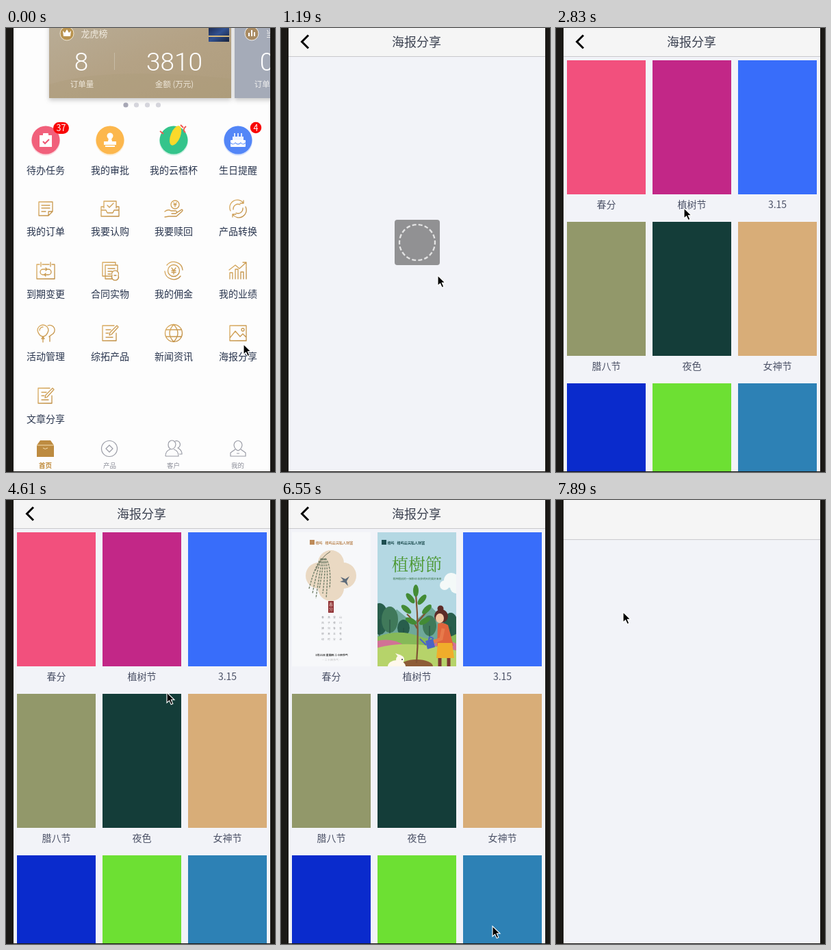
Animation, 393 px wide and 646 px high, one loop 8 s. Source, as an HTML page:

```html
<!DOCTYPE html>
<html lang="zh-CN">
<head>
<meta charset="utf-8">
<style>
html, body { margin: 0; width: 100%; height: 100%; overflow: hidden; background: #1b1916; }
svg { display: block; font-family: "Noto Sans CJK SC", "Noto Sans CJK", sans-serif; }
.serif { font-family: "Noto Serif CJK SC", "Noto Sans CJK SC", serif; }
.thin { font-family: Roboto, sans-serif; font-weight: 300; }
.line { fill: none; stroke: url(#gold); stroke-width: 1.3; stroke-linejoin: round; stroke-linecap: round; }
.tab { fill: none; stroke: #9a9ca6; stroke-width: 1.2; stroke-linejoin: round; }
</style>
</head>
<body>
<svg id="stage" width="393" height="646" viewBox="0 0 393 646"></svg>
<script>
const text = (x, y, str, size, fill, more = '') =>
  `<text x="${x}" y="${y}" font-size="${size}" fill="${fill}" text-anchor="middle" ${more}>${str}</text>`;
const column = (x, y, str, size, fill, step = size * 1.1) =>
  [...str].map((c, i) => text(x, y + i * step, c, size, fill)).join('');
const rect = (x, y, w, h, fill, more = '') =>
  `<rect x="${x}" y="${y}" width="${w}" height="${h}" fill="${fill}" ${more}/>`;
const disc = (x, y, r, fill, more = '') => `<circle cx="${x}" cy="${y}" r="${r}" fill="${fill}" ${more}/>`;
const oval = (x, y, rx, ry, fill, more = '') =>
  `<ellipse cx="${x}" cy="${y}" rx="${rx}" ry="${ry}" fill="${fill}" ${more}/>`;
const shape = (d, fill, more = '') => `<path d="${d}" fill="${fill}" ${more}/>`;
const stroke = (d, color, width, more = '') =>
  `<path d="${d}" fill="none" stroke="${color}" stroke-width="${width}" ${more}/>`;
const at = (x, y, body, more = '') => `<g transform="translate(${x} ${y})" ${more}>${body}</g>`;
const range = (n, f) => Array.from({ length: n }, (_, i) => f(i)).join('');
const ring = r => `M${-r} 0A${r} ${r} 0 1 1 ${r} 0A${r} ${r} 0 1 1 ${-r} 0`;

// ---------- home page ----------
const cols = [58, 152, 245, 339];
const yen = 'M-3-4L0 0L3-4M0 0V5M-3 0H3M-3 2.5H3';
const pen = 'M6-11H-11V11H9V0M-6-5H1M-6 0H-2M-6 6H4M-1 3L0-1L10-11L12-9L2 2Z';
const menu = [
  ['我的订单', 'M4 10H-10V-10H10V4L4 10V4H10M-6-5H6M-6-1H6M-6 4H0'],
  ['我要认购', 'M-9-1V-11H9V-1M-9-3H-13V11H13V-3H9M-13 2H-6L-4 6H4L6 2H13M-4-5L-1-2L5-8'],
  ['我要赎回', 'M-13 4Q-8 0-4 3H3Q6 4 3 7H-3M4 6L12 1Q14 2 12 4L4 11H-7L-13 12'
    + 'M-4-6A6 6 0 1 1 8-6A6 6 0 1 1-4-6M0-9L2-6L4-9M2-6V-3M0-6H4'],
  ['产品转换', 'M-11 3A11 11 0 0 1 8-8M8-8V-12M8-8H3M11-3A11 11 0 0 1-8 8M-8 8V12M-8 8H-3'
    + 'M-7 1A7 7 0 0 1 3-6M7-1A7 7 0 0 1-3 6'],
  ['到期变更', 'M-9-9H-13V12H13V-9H9M-5-9H5M-7-12V-6M7-12V-6M-1 6H-4A4 4 0 0 1-4-2H2M1-2H4A4 4 0 0 1 4 6H-2M0-4L2-2L0 0M0 4L-2 6L0 8'],
  ['合同实物', 'M2 8H-11V-12H8V-9M-7-8H11V0M-7-8V12H3M-3-3H7M-3 1H3M-3 5H1M3 7A5 5 0 1 1 12 7A5 5 0 1 1 3 7M6 7H9'],
  ['我的佣金', 'M-10-8A13 13 0 0 1 13-1M10 8A13 13 0 0 1-13 1' + ring(8.5) + yen],
  ['我的业绩', 'M-12 12V3H-8V12M-4 12V-2H0V12M4 12V2H8V12M12 12V-6M-13-1L-4-8L2-3L12-12M7-12H12V-7'],
  ['活动管理', 'M-12-4A8 8 0 1 1 4-4Q2 4-4 5Q-10 4-12-4M-4 5L-6 8H-2ZM-4 8V13M3-11A7 7 0 0 1 9 2L5 5M6 5V12M-9-4A5 5 0 0 1-4-9'],
  ['综拓产品', pen],
  ['新闻资讯', ring(12.5) + 'M0-12.5Q-12 0 0 12.5Q12 0 0-12.5M-11-5H11M-11 5H11'],
  ['海报分享', 'M-12-11H12V11H-12ZM-12 7L-4-3L3 5L7 1L12 6M5-5A2 2 0 1 1 9-5A2 2 0 1 1 5-5'],
  ['文章分享', pen]
];
const topIcons = [
  shape('M-9-7H9V10H-9Z', '#fff') + rect(-4, -10, 8, 5, '#fff', 'rx="1"') + stroke('M-4 2L-1 5L5-1', '#ee5572', 2),
  disc(0, -6, 4.5, '#fff') + shape('M-2-3H2L3 2H9V7H-9V2H-3Z', '#fff') + rect(-7, 8, 14, 2, '#fff'),
  oval(0, -7, 7, 15, '#fbd92b', 'transform="rotate(22)"') + stroke('M10-22L14-18M17-11Q12-15 18-20M-15-9L-20-13', '#f05a54', 2),
  rect(-11, 0, 22, 10, '#fff', 'rx="1"') + rect(-8, -5, 16, 5, '#eef3ff')
    + stroke('M-5-5V-10M0-5V-10M5-5V-10', '#fff', 1.6) + stroke('M-11 4Q-7 8-4 4Q0 8 4 4Q7 8 11 4', '#79a4fb', 1.2)
];
const topNames = ['待办任务', '我的审批', '我的云梧杯', '生日提醒'];
const topFills = ['#f1607b', '#fcb74d', '#34c48b', '#5386f7'];
const ink = '#28344d';

const card = rect(63, -10, 266, 112, 'url(#tan)', 'filter="url(#soft)"')
  + shape('M63 82Q150 55 329 74V102H63Z', '#a99676', 'opacity=".25"')
  + disc(89, 8, 10, '#b9934f', 'stroke="#f1e6cf"')
  + shape('M83 4L86 7L89 2L92 7L95 4L94 12H84Z', '#fff')
  + text(129, 13, '龙虎榜', 13, '#f0eadf')
  + text(110, 62, '8', 37, '#fff', 'class="thin"') + text(246, 62, '3810', 37, '#fff', 'class="thin"')
  + text(111, 86, '订单量', 11.5, '#eee7da') + text(246, 86, '金额 (万元)', 11.5, '#eee7da')
  + rect(158, 36, 1, 25, '#c7bca6')
  + rect(296, -4, 30, 24, 'url(#night)') + rect(296, 11, 30, 2, '#d5b77b')
  + rect(334, -10, 60, 112, '#a5abb8', 'filter="url(#soft)"')
  + disc(359, 8, 10, '#a98b62', 'stroke="#eee"') + stroke('M355 12V7M359 12V3M363 12V6', '#fff', 2)
  + text(386, 13, '当', 13, '#eee') + text(381, 62, '0', 37, '#fff', 'class="thin"')
  + text(380, 86, '订单量', 11.5, '#eee');

const home = rect(11, 0, 375, 645, '#fdfdfd') + card
  + [175, 190.5, 206.5, 222.5].map((x, i) => disc(x, 112, 3.6, i ? '#d5d5dc' : '#a7a7b5')).join('')
  + cols.map((x, i) => at(x, 163, disc(0, 1.5, 21, topFills[i], 'opacity=".25"') + disc(0, 0, 20.5, topFills[i]) + topIcons[i])
    + text(x, 212, topNames[i], 14, ink)).join('')
  + rect(69, 137, 23, 17, '#f80404', 'rx="8.5"') + text(80.5, 150, '37', 12.5, '#fff')
  + disc(365, 145, 8.2, '#f80404') + text(365, 149.5, '4', 12.5, '#fff')
  + menu.map(([name, d], i) => {
    const x = cols[i % 4], y = [263, 353, 444, 535][i >> 2];
    return at(x, y, `<path class="line" d="${d}"/>`) + text(x, [301, 392, 483, 574][i >> 2], name, 14, ink);
  }).join('')
  + shape('M45 607L50 600H65L70 607V624H45Z', 'url(#gold)') + stroke('M45 607H70M54 611Q57 614 61 611', '#f5dfb3', 1)
  + `<g class="tab">${at(151, 612, `<path d="${ring(11.5)}M0-5L5 0L0 5L-5 0Z"/>`)
    + at(245, 612, '<path d="M-8-6A5.5 6 0 1 1 3-6Q2 0-3 1Q-8 0-8-6M-12 11Q-12 3-5 1M0 1Q7 3 7 11H-12M2-11A5 5 0 1 1 6-1Q12 2 12 8H8"/>')
    + at(339, 612, '<path d="M-6-5A6 6.5 0 1 1 6-5Q5 1 0 3Q-5 1-6-5M-4 1L-11 6V11H11V6L4 1M-2 7H2"/>')}</g>`
  + ['首页', '产品', '客户', '我的'].map((s, i) =>
    text(cols[i] - .5, 639.5, s, 9.5, i ? '#8b8d98' : '#c08c3c', i ? '' : 'font-weight="700"')).join('');

// ---------- posters, each 115 by 195 ----------
const brand = (x, color) => rect(x, 11, 7, 7, color) + text(x + 13.5, 16.5, '梧屿', 5, color, 'font-weight="700"')
  + text(x + 43, 16.5, '梧屿云岚私人财富', 5.1, color, 'font-weight="700"');

const spring = rect(0, 0, 115, 195, '#f7f8fa')
  + [[57, 45], [57, 81], [39, 63], [75, 63]].map(([x, y]) => disc(x, y, 19, '#ead9c3')).join('')
  + rect(42, 48, 30, 30, '#ead9c3')
  + range(7, i => stroke(`M${43 + i} 38Q${34 + i * 4} 48 ${25 + i * 5} ${82 + i % 3 * 7}`, '#75826c', 1.4, 'stroke-dasharray="3 1.5"'))
  + stroke('M56 28Q42 36 34 56', '#6c6f5b', 1)
  + shape('M71 65L78 68L84 64L80 71L82 78L77 73L70 72L75 70Z', '#5d6b7a')
  + rect(53, 100, 8, 17, '#8f3034') + column(57, 107, '春分', 6, '#eed5cb', 7)
  + [45, 54, 62, 71].map((x, i) => column(x, 125, ['春风拂柳绿', '燕子归来时', '昼夜各半分', '山川皆有诗'][i], 3.5, '#8b8d92', 8)).join('')
  + text(58, 180, '3月21日 星期四 二十四节气', 3.9, '#333', 'font-weight="700"')
  + text(58, 187, '— 二 十 四 节 气 —', 3.4, '#aaa') + brand(26, '#bd8a58');

const leaf = (x, y, turn) => oval(0, 0, 9, 4, '#438b35', `transform="translate(${x} ${y}) rotate(${turn})"`);
const arbor = rect(0, 0, 115, 195, '#b4d8e3')
  + [[108, 70, 11], [98, 77, 7], [115, 80, 9], [2, 158, 11], [12, 163, 6]].map(([x, y, r]) => disc(x, y, r, '#f4f9f8')).join('')
  + shape('M0 150L28 112L52 132L78 108L115 145V160H0Z', '#6fa89a')
  + [[3, 126, 13, 23], [18, 127, 12, 19], [38, 139, 9, 12], [76, 136, 10, 15], [107, 137, 11, 20]]
    .map(([x, y, w, h], i) => oval(x, y, w, h, i % 2 ? '#40795a' : '#285e4c') + rect(x - .5, y, 1, h + 4, '#224c3d')).join('')
  + shape('M0 152Q30 140 60 151T115 148V195H0Z', '#86b958')
  + shape('M0 158Q22 153 40 165L0 171Z', '#d17295') + shape('M78 164Q100 153 115 162V172Z', '#d17295')
  + shape('M0 168Q45 156 115 172V195H0Z', '#b6d36a')
  + oval(57, 195, 24, 10, '#8d5c37') + stroke('M57 190Q61 145 56 90M58 140Q50 125 43 119M59 130Q68 120 72 115', '#805335', 2.2)
  + leaf(56, 85, 90) + leaf(48, 96, 50) + leaf(65, 98, -50) + leaf(42, 112, 40) + leaf(72, 112, -45) + leaf(49, 129, 25) + leaf(69, 129, -30)
  + disc(92, 111, 4.5, '#5c2b27') + disc(93, 122, 10, '#5c2b27') + oval(91, 125, 6, 7, '#f3c7a4')
  + shape('M88 133Q96 130 103 135L111 165H87Z', '#df653c') + shape('M88 161H109L112 183H86Z', '#f0ad2b')
  + stroke('M91 183V195M104 183V195', '#7b3832', 5) + stroke('M96 140L93 155L80 160', '#e77a4b', 5)
  + shape('M70 158L81 155L84 167L73 170Z', '#4b64c4') + stroke('M71 164L62 155M75 157Q75 149 82 155', '#4b64c4', 2)
  + oval(28, 195, 13, 9, '#fff8ec') + disc(33, 185, 6, '#fff8ec') + shape('M30 181L26 176L35 179Z', '#fff8ec') + disc(36, 185, 1, '#333')
  + brand(6, '#1e4e51') + text(57.5, 56, '植樹節', 24.5, '#4a972f', 'class="serif" font-weight="500"')
  + text(58, 69, '栽种眼前的一抹新绿 收获明天的美好未来', 3.9, '#397244');

const trust = rect(0, 0, 115, 195, '#cacaca') + rect(0, 0, 115, 195, 'url(#shine)') + brand(6, '#363b3e')
  + text(39, 76, '誠', 45, 'url(#gilt)', 'class="serif" font-weight="700" transform="rotate(-5 39 60)"')
  + text(84, 73, '信', 39, 'url(#gilt)', 'class="serif" font-weight="700" transform="rotate(-5 84 60)"')
  + text(58, 104, '3.15', 22, '#9b692a', 'font-weight="700" font-style="italic" font-family="Lato, sans-serif"')
  + column(29, 131, '坚守每一分信任的重量', 4, '#4d4d4d', 5.2) + column(21, 131, '信任', 4, '#4d4d4d', 5.2)
  + at(64, 117, rect(0, 0, 27, 7, '#dfb889', 'transform="rotate(15)"'))
  + range(9, i => {
    const x = 60 + i * 5 % 7, y = 127 + i * 8;
    return rect(x, y, 35, 7.4, i % 2 ? '#d8b083' : '#c69867') + rect(x, y, 35, 1.5, '#ead0ac')
      + (i % 2 ? rect(x + 11, y, 1, 7, '#a57949') + rect(x + 23, y, 1, 7, '#a57949') : '');
  }) + shape('M56 148H83L79 155H54Z', '#e0bc8c');

const blossom = (x, y) => range(5, i => disc(x + 3 * Math.cos(i * 1.257), y + 3 * Math.sin(i * 1.257), 2.1, '#f4c55c')) + disc(x, y, 1.3, '#a83b31');
const laba = rect(0, 0, 115, 195, '#e4535e')
  + range(5, i => stroke(`M${i * 24 - 9} 111a12 12 0 0 1 24 0m-20 0a8 8 0 0 1 16 0m-12 0a4 4 0 0 1 8 0`, '#cd4450', 1))
  + stroke('M0 21L11 28L22 38M7 25L14 19L27 25M0 38L14 30', '#572d29', 1.8)
  + blossom(5, 23) + blossom(15, 20) + blossom(22, 36) + blossom(4, 36) + blossom(27, 26)
  + stroke('M115 143L101 151L95 160M109 147L115 157', '#572d29', 1.5) + blossom(103, 151) + blossom(111, 158)
  + brand(26, '#f6ddae')
  + [['腊', 47, 51], ['八', 72, 49], ['快', 47, 88], ['乐', 72, 87]].map(([c, x, y]) =>
    text(x, y, c, 28, '#f2d19a', `class="serif" font-weight="700" transform="rotate(-7 ${x} ${y})"`)).join('')
  + rect(83, 44, 6, 45, '#86303c') + column(86, 49, '腊八粥香暖人心', 3.8, '#f1cda0', 6)
  + shape('M25 120Q27 151 47 162H73Q92 150 95 120Z', '#f5dec0') + stroke('M28 134Q60 151 92 134M34 146Q60 160 87 146', '#c66559', 1.3, 'stroke-dasharray="3 2"')
  + oval(60, 120, 35, 16, '#fff0da') + oval(60, 120, 31, 13, '#ba7961')
  + range(25, i => oval(60 + 26 * Math.sin(i * 2.4) * Math.sqrt(i / 25), 120 + 10 * Math.cos(i * 2.4) * Math.sqrt(i / 25), 3.2, 2.3, ['#f4dcc0', '#80332e', '#dda582'][i % 3]))
  + stroke('M75 119L95 107', '#f6e3c7', 4, 'stroke-linecap="round"')
  + ['冬日暖阳里一碗热粥让人心头温暖，愿岁岁年年', '皆有好滋味，平安喜乐', '愿每一份守候都被温暖，腊八节快乐'].map((s, i) => text(58, 176 + i * 6, s, 4, '#5c2228')).join('');

const posters = [spring, arbor, trust, laba];
const loadSteps = [41, 42, 45, 47];
const tiles = ['#f2507d', '#c22787', '#386dfa', '#92986a', '#143d39', '#d8ad78', '#0a2bcc', '#6de033', '#2d81b5'];
const captions = ['春分', '植树节', '3.15', '腊八节', '夜色', '女神节'];
const tile = i => [16 + i % 3 * 125, 47 + Math.floor(i / 3) * 235];

const listPage = rect(11, 0, 375, 646, '#f2f3f8') + rect(11, 0, 375, 41, '#f5f5f5') + rect(11, 41, 375, 1, '#c9c9cc')
  + stroke('M40 10.5L30.5 20L40 29.5', '#000', 3) + text(198, 26.5, '海报分享', 18, '#3d4352')
  + `<g id="grid">${tiles.map((c, i) => {
    const [x, y] = tile(i);
    return rect(x, y, 115, 195, c) + text(x + 57.5, y + 215, captions[i] || '', 14, '#4b5166');
  }).join('')}${posters.map((p, i) => at(...tile(i), p, `id="poster${i}" clip-path="url(#posterClip)"`)).join('')}</g>`
  + `<g id="loader">${rect(166, 279, 66, 66, '#919193', 'rx="4"')}<circle id="spinner" cx="199" cy="312" r="26" fill="none"
    stroke="#e3e3e3" stroke-width="2.3" pathLength="18" stroke-dasharray=".65 .35"/></g>`;

const sheet = rect(11, -47, 375, 720, '#f2f3f8') + rect(11, -47, 375, 88, '#f5f5f5') + rect(11, 41, 375, 1, '#c9c9cc');

const stops = list => list.map((c, i) => `<stop offset="${i / (list.length - 1)}" stop-color="${c}"/>`).join('');
const gradient = (id, ...list) => `<linearGradient id="${id}" x2="1" y2="1">${stops(list)}</linearGradient>`;
const stage = document.getElementById('stage');
stage.innerHTML = `<defs>
  <linearGradient id="gold" gradientUnits="userSpaceOnUse" x1="-12" y1="-12" x2="12" y2="12">${stops(['#dcae63', '#bd8b40'])}</linearGradient>
  ${gradient('tan', '#b9ad97', '#b4a285', '#af9d7d')}${gradient('night', '#182448', '#315191', '#17223b')}
  ${gradient('shine', '#ddd8', '#c3c3c3', '#d5d5d5')}${gradient('gilt', '#8f5b1e', '#e0b761', '#a8752c')}
  <filter id="soft"><feDropShadow dx="0" dy="3" stdDeviation="3" flood-color="#777" flood-opacity=".4"/></filter>
  <clipPath id="phone"><rect x="11" width="375" height="645"/></clipPath>
  <clipPath id="posterClip"><rect width="115" height="195"/></clipPath></defs>
  ${rect(0, 0, 393, 646, '#1b1916')}
  <g clip-path="url(#phone)"><g id="home">${home}</g><g id="list">${listPage}</g><g id="sheet">${sheet}</g></g>
  <path id="cursor" d="M0 0V15L3.6 11.8L6.2 17.6L8.8 16.4L6.3 10.8H11Z" fill="#000" stroke="#fff" stroke-width="1.1"/>`;

// ---------- motion ----------
const LOOP = 8000, STEP = 148.5;
const el = id => document.getElementById(id);
const move = (id, x, y) => el(id).setAttribute('transform', `translate(${x} ${y})`);
const show = (id, on) => el(id).style.display = on ? '' : 'none';
// critically damped spring: 1 at rest, falling to 0
const settle = ms => { const k = Math.max(0, ms) * .019; return (1 + k) * Math.exp(-k); };

// step, x, y
const trail = [[0, 347, 460], [1, 344, 460], [3, 344, 460], [8, 229, 360], [18, 229, 360], [19, 187, 262],
  [23, 133, 225], [26, 143, 205], [29, 301, 240], [31, 235, 280], [39, 235, 280], [44, 309, 620],
  [47, 170, 157], [48, 115, 155], [49, 98, 163], [60, 98, 163]];
function cursorAt(step) {
  const i = trail.findIndex(k => k[0] > step), [s, x, y] = trail[i - 1], [s2, x2, y2] = trail[i];
  const p = (step - s) / (s2 - s);
  return [x + (x2 - x) * p, y + (y2 - y) * p];
}

function draw(now) {
  const step = Math.floor(now % LOOP / STEP), t = step * STEP;
  const push = step < 3 ? 1 : step > 7 ? 0 : settle(t - 380);
  move('home', -112 * (1 - push), 0);
  show('home', push > 0);
  move('list', 375 * push, 0);
  show('grid', step >= 16);
  show('loader', step < 17);
  el('spinner').setAttribute('transform', `rotate(${t * .18} 199 312)`);
  loadSteps.forEach((s, i) => show('poster' + i, step >= s));
  show('sheet', step >= 51);
  move('sheet', 0, 690 * settle(t - 7573));
  move('cursor', ...cursorAt(step));
  requestAnimationFrame(draw);
}
requestAnimationFrame(draw);
</script>
</body>
</html>
```
